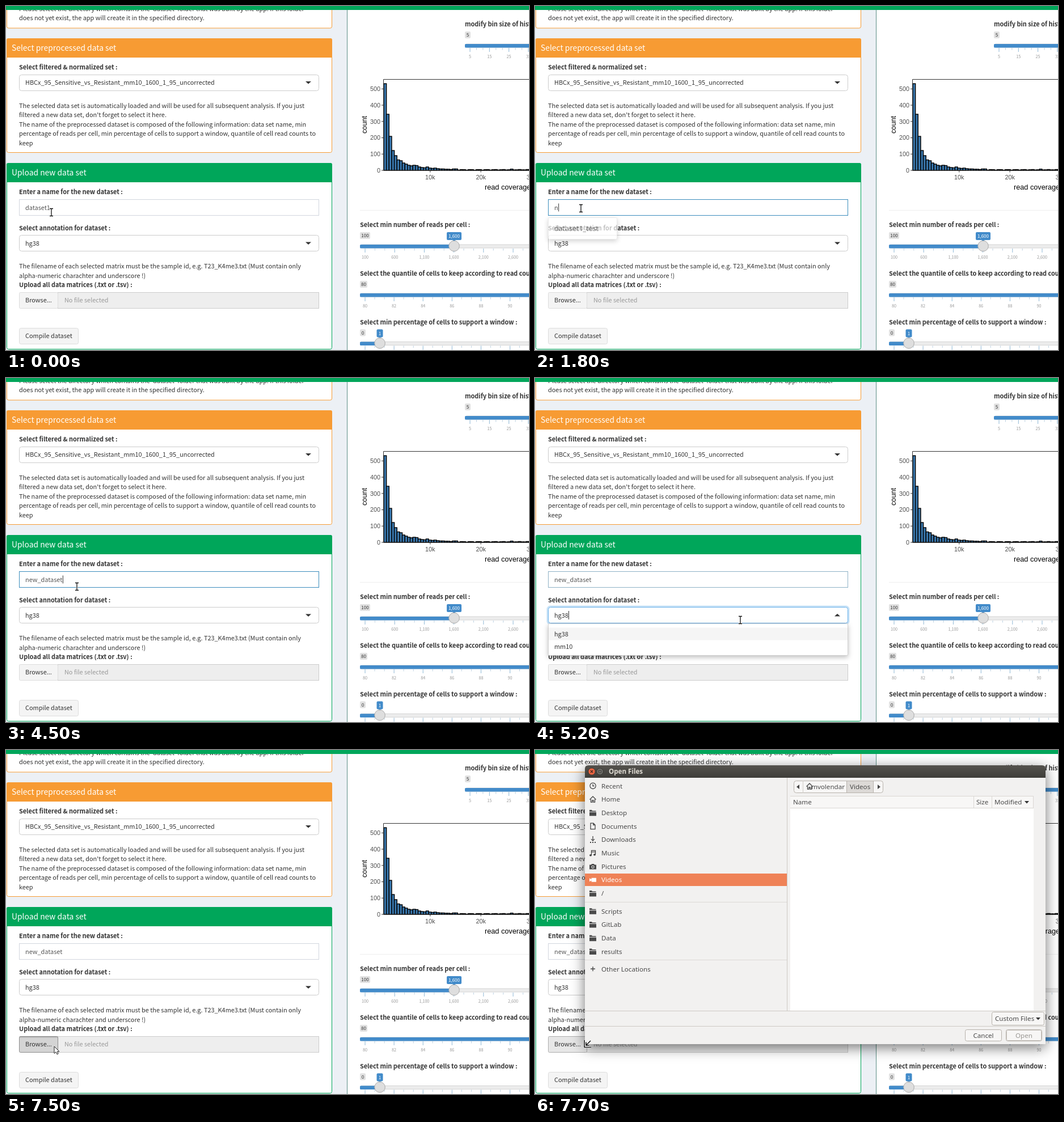
These frames come from a looping animation (922x607 px, 8000 ms). An HTML page:

```html
<!DOCTYPE html>
<html lang="en">
<head>
<meta charset="utf-8">
<title>Upload new data set</title>
<style>
  html, body { margin: 0; width: 100%; height: 100%; overflow: hidden; background: #fff; }
  svg { display: block; }
  text { font: 10.9px 'Noto Sans CJK SC', 'Noto Sans CJK JP', 'Noto Sans CJK KR', 'Noto Sans CJK', sans-serif; fill: #333; white-space: pre; }
  .b { font-weight: 700; }
  .title { font-size: 13.85px; fill: #fff; }
  .field { fill: #555; }
  .muted { fill: #999; }
  .pill { font-size: 8.1px; text-anchor: middle; }
  .grid { font-size: 7.2px; text-anchor: middle; fill: #999; }
  .axis { font: 10.8px 'Liberation Sans', Arial, sans-serif; fill: #4d4d4d; }
  .name { font: 12.7px 'Liberation Sans', Arial, sans-serif; fill: #000; }
  .ui { font: 11.6px 'Noto Sans', 'Open Sans', sans-serif; fill: #4a4a4a; }
  .ui.b { font-weight: 700; fill: #dfdbd2; }
  .mid { text-anchor: middle; }
  .end { text-anchor: end; }
  #dialog { filter: drop-shadow(0 6px 12px rgba(0, 0, 0, .55)); }
  #menu, #history { filter: drop-shadow(0 3px 4px rgba(0, 0, 0, .25)); }
</style>
</head>
<body>
<svg id="stage" width="922" height="607" viewBox="0 0 922 607"></svg>
<script>
const BLUE = '#428bca', GREEN = '#00a65a', ORANGE = '#f79b33';

const text = (x, y, str, cls = '', extra = '') =>
  `<text x="${x}" y="${y}" class="${cls}" ${extra}>${str}</text>`;
const rect = (x, y, w, h, fill, extra = '') =>
  `<rect x="${x}" y="${y}" width="${w}" height="${h}" fill="${fill}" ${extra}/>`;
const framed = (x, y, w, h, fill, stroke, r = 0, extra = '') =>
  rect(x + .5, y + .5, w - 1, h - 1, fill, `stroke="${stroke}" rx="${r}" ${extra}`);
const path = (d, fill = 'none', extra = '') => `<path d="${d}" fill="${fill}" ${extra}/>`;
const line = (d, stroke, width = 1, extra = '') =>
  path(d, 'none', `stroke="${stroke}" stroke-width="${width}" ${extra}`);
const lines = (x, y, step, rows) => rows.map((row, i) => text(x, y + i * step, row)).join('');
const down = (x, y, w = 10, h = 4.5, fill = '#333') => path(`M${x} ${y}h${w}l${-w / 2} ${h}z`, fill);

function panel(y, bottom, color, title) {
  return framed(1, y, 574, bottom - y, '#fff', color, 3) +
    path(`M1 ${y + 34}V${y + 3}q0-3 3-3h568q3 0 3 3v31z`, color) +
    text(10, y + 22, title, 'title');
}

function leftSide() {
  return framed(1, -20, 574, 59.5, '#fff', ORANGE, 3) +
    lines(23, 8.5, 16.5, [
      "Please select the directory which contains the 'dataset' folder that was built by the app. If this folder",
      'does not yet exist, the app will create it in the specified directory.']) +
    panel(57, 259, ORANGE, 'Select preprocessed data set') +
    text(23, 112, 'Select filtered &amp; normalized set :', 'b') +
    framed(23, 121, 529, 29, '#fff', '#ccc', 4) +
    text(34, 139, 'HBCx_95_Sensitive_vs_Resistant_mm10_1600_1_95_uncorrected') + down(528, 133) +
    lines(23, 179.5, 16.5, [
      'The selected data set is automatically loaded and will be used for all subsequent analysis. If you just',
      "filtered a new data set, don't forget to select it here.",
      'The name of the preprocessed dataset is composed of the following information: data set name, min',
      'percentage of reads per cell, min percentage of cells to support a window, quantile of cell read counts to',
      'keep']) +
    panel(277, 606, GREEN, 'Upload new data set') +
    text(23, 332, 'Enter a name for the new dataset :', 'b') +
    framed(23, 341, 529, 29, '#fff', '#d2d6de', 0, 'id="input"') +
    rect(34, 347.5, 45, 16, '#f07746', 'id="selection"') +
    text(34, 359.5, '', 'field', 'id="typed"') +
    rect(0, 348.5, 1, 14, '#333', 'id="caret"') +
    text(23, 396, 'Select annotation for dataset :', 'b') +
    rect(22, 403, 531, 31, 'none', 'id="glow" rx="5" stroke="#66afe9" stroke-opacity=".35" stroke-width="3"') +
    framed(23, 404, 529, 29, '#fff', '#ccc', 4, 'id="select"') +
    text(34, 422.5, 'hg38') + rect(59, 411, 1, 15, '#333', 'id="selectCaret"') +
    path('', '#333', 'id="chevron"') +
    lines(23, 463, 16.5, [
      'The filename of each selected matrix must be the sample id, e.g. T23_K4me3.txt (Must contain only',
      'alpha-numeric charachter and underscore !)']) +
    text(23, 496, 'Upload all data matrices (.txt or .tsv) :', 'b') +
    framed(91, 505, 461, 29, '#eee', '#ccc') + text(103, 523, 'No file selected', 'muted') +
    framed(23, 505, 69, 29, '#f4f4f4', '#ddd', 2, 'id="browse"') +
    line('M24 506.5H91', '#000', 3, 'id="pressed" opacity=".1"') +
    text(34, 522.5, 'Browse...') +
    framed(23, 568, 105, 29, '#f4f4f4', '#ddd', 3) + text(34, 586, 'Compile dataset');
}

function histogram() {
  const step = 4.65;
  const head = [153, 99, 60, 35, 26, 18.5, 17, 13, 11, 9, 8, 9, 8.5, 6, 5, 4.5, 6, 4,
    3.5, 4, 3, 2.5, 2.5, 2, 2, 1.5, 2.5, 2.5];
  let out = '';
  for (let i = 0; i < 56; i++) {
    const h = head[i] ?? (i === 48 ? 2.2 : .4 + 1.1 * Math.abs(Math.sin(i * 7.3)));
    out += rect(666 + i * step, 290 - h, step, h, '#3a78ae', 'stroke="#000" stroke-width="1.4"');
  }
  out += line('M922 129.5H665.5V290H922', '#333');
  for (let i = 0; i < 6; i++) {
    const y = 290 - i * 28.75;
    out += line(`M662 ${y}h3.5`, '#333') + text(660, y + 3.8, i * 100, 'axis end');
  }
  for (let i = 1; i < 4; i++) {
    const x = 658.5 + i * 89.3;
    out += line(`M${x} 290v3.5`, '#333') + text(x, 306, i * 10 + 'k', 'axis mid');
  }
  return out + text(844, 324, 'read coverage', 'name') +
    text(0, 0, 'count', 'name mid', 'transform="translate(636 209.5) rotate(-90)"');
}

// One range slider; y is the centre of its bar.
function slider(x, y, min, minWidth, first, step, labels, value, valueX, valueWidth) {
  let out = rect(x, y - 25, minWidth, 12, '#e1e1e1', 'rx="2"') + text(x + minWidth / 2, y - 16, min, 'pill');
  out += framed(x, y - 3.5, 330, 7, '#ececec', '#d5d5d5', 3) +
    rect(x, y - 3, (valueX ?? 950) - x, 6.5, BLUE, 'rx="1.5"');
  labels.forEach((label, i) => {
    const tick = first + i * step;
    out += line(`M${tick} ${y + 4}v7`, '#8fb8d6') +
      line(`M${tick + step / 3} ${y + 4}v3.5M${tick + step * 2 / 3} ${y + 4}v3.5`, '#b9cfe0') +
      text(tick, y + 22, label, 'grid');
  });
  if (value) {
    out += rect(valueX - valueWidth / 2, y - 25, valueWidth, 14, BLUE, 'rx="2"') + down(valueX - 2.5, y - 11, 5, 3, BLUE) +
      text(valueX, y - 15, value, 'pill', 'style="fill:#fff"') +
      `<circle cx="${valueX}" cy="${y - .5}" r="9.3" fill="#dedede" stroke="#aaa"/>`;
  }
  return out;
}

function rightSide() {
  return rect(601, 0, 321, 607, '#fff') + line('M601.5 0V607', '#5c8f86') +
    text(809, 36, 'modify bin size of histogram :', 'b') +
    slider(809, 70, 5, 10, 818, 34.3, [5, 15, 25, 35]) +
    histogram() + line('M624 360.5H922', '#eee') +
    text(624, 390, 'Select min number of reads per cell :', 'b') +
    slider(624, 424, 100, 18, 633, 52.2, [100, 600, '1,100', '1,600', '2,100', '2,600'], '1,600', 790, 26) +
    text(624, 476, 'Select the quantile of cells to keep according to read counts :', 'b') +
    slider(624, 510, 80, 13, 633, 51.1, [80, 82, 84, 86, 88, 90]) +
    text(624, 562, 'Select min percentage of cells to support a window :', 'b') +
    slider(624, 595.5, 0, 10, 633, 51.1, [0, 2, 4, 6, 8, 10], 1, 659, 11);
}

const menu = () => `<g id="menu">${framed(23, 433, 529, 57, '#fff', '#d0d0d0', 2)}
  ${rect(24, 440.5, 527, 22, '#f5f5f5', 'id="row"')}</g>
  <g id="menuText">${text(34, 455.5, 'hg38') + text(34, 477.5, 'mm10')}</g>`;

const historyList = () => `<g id="history">${framed(23, 373, 122, 39, '#fff', '#e2e2e2', 2)}
  ${text(34, 397, 'dataset1_test', 'ui', 'style="font-size:12.4px"')}</g>`;

const ICONS = {
  clock: line('M6 .8a5.2 5.2 0 1 0 .1 0M6 3v3.2h2.5', '#444', 1.3),
  home: line('M.5 6.5L6 1l5.500 5.500M2.500 6v5.200h2.500v-3.500h2v3.500h2.500V6', '#444', 1.3),
  folder: path('M0 1h4l1 1.500h6.500v1.500H0zM0 5h12v6.500H0z', '#4a4a4a'),
  page: line('M2 .8h5l3 3v7.500H2zM6.800 1v3h3', '#444', 1.3),
  load: line('M6 0v7M3 5l3 3 3-3', '#444', 1.3) + path('M1 10h2v2H1zM5 10h2v2H5zM9 10h2v2H9z', '#444'),
  music: line('M3.500 9.500V1.500h7v7M3.500 4h7', '#444', 1.3) + path('M0 10a2 1.800 0 1 1 4 0a2 1.800 0 1 1-4 0M7 9a2 1.800 0 1 1 4 0a2 1.800 0 1 1-4 0', '#444'),
  camera: path('M0 3h3l1-1.500h4L9 3h3v8H0z', '#4a4a4a') + '<circle cx="6" cy="6.800" r="2.200" fill="#4a4a4a" stroke="#fff"/>',
  film: path('M3.500 2.500H12v7H3.500V7L0 9V3l3.500 2z', '#fff'),
  plus: line('M2 6h8M6 2v8', '#444', 1.4)
};
const icon = (name, x, y) => `<g transform="translate(${x} ${y})">${ICONS[name]}</g>`;

function dialog() {
  const places = [['clock', 'Recent'], ['home', 'Home'], ['folder', 'Desktop'], ['page', 'Documents'],
    ['load', 'Downloads'], ['music', 'Music'], ['camera', 'Pictures'], ['film', 'Videos'], ['folder', '/'],
    ['folder', 'Scripts'], ['folder', 'GitLab'], ['folder', 'Data'], ['folder', 'results'], ['plus', 'Other Locations']];
  const rows = places.map(([kind, label], i) => {
    const y = 63.300 + i * 23.700 + (i > 8 ? 7.700 : 0) + (i > 12 ? 7.200 : 0);
    return icon(kind, 96, y - 6) + text(117, y + 4.200, label, 'ui', kind === 'film' ? 'style="fill:#fff"' : '');
  }).join('');
  const button = (x, y, w, h, label, color = '#4a4a4a') => framed(x, y, w, h, '#f7f6f5', '#b6b1aa', 3) +
    text(x + w / 2, y + h / 2 + 4.200, label, 'ui mid', `style="fill:${color}"`);

  return `<g id="dialog">` +
    path('M88 519V33q0-6 6-6h800q6 0 6 6v486z', '#f2f1f0') +
    path('M88 49V33q0-6 6-6h800q6 0 6 6v16z', 'url(#bar)') +
    '<circle cx="100" cy="38" r="6.200" fill="#ee6642" stroke="#34332f"/>' +
    line('M97.800 35.800l4.400 4.400m0-4.400l-4.400 4.400', '#4a2a20', 1.3) +
    '<circle cx="114.500" cy="38" r="5.800" fill="#706f6a" stroke="#34332f"/>' +
    line('M112.300 35.800h4.400v4.400h-4.400z', '#3a3935') +
    text(130, 42.300, 'Open Files', 'ui b') +
    rect(88, 218, 356, 22, '#ef8257') + rows +
    line('M88 268.500H444M88 370.500H444', '#dcd9d6') +
    line('M444.500 49V460M88 460.500H900M88 487.500H900', '#cdc9c4') +
    framed(456, 54, 158, 22, '#f7f6f5', '#b8b3ac', 4) +
    rect(549.500, 54.500, 47, 21, '#dcd9d6', 'stroke="#b8b3ac"') +
    line('M472.500 54V76', '#d0ccc7') +
    path('M466 61v8l-5-4zM604 61v8l5-4z', '#444') +
    text(546, 69.300, 'mvolendar', 'ui end') + icon('home', 478, 58) + text(555, 69.300, 'Videos', 'ui') +
    rect(450, 81, 429, 379, '#fff') + rect(450, 81, 429, 22, '#f8f7f6') +
    line('M450 81.500H879M450 102.500H879M773.500 81V103M805.500 81V103M878.500 81V103', '#dad7d3') +
    text(455, 96.200, 'Name', 'ui') + text(778, 96.200, 'Size', 'ui') + text(810, 96.200, 'Modified', 'ui') +
    down(863, 90, 8, 4.500) +
    button(805, 462, 93, 24, '') + text(811, 478, 'Custom Files', 'ui') + down(883, 472, 8, 4.500) +
    button(758, 493, 65, 21, 'Cancel') + button(830, 493, 64, 21, 'Open', '#9a9894') +
    framed(831, 494, 62, 19, 'none', '#c9c5c0', 2) + '</g>';
}

const halo = (d, width) => line(d, '#fff', width + 1.600) + line(d, '#111', width);
const CURSORS = {
  beam: halo('M-3-6.500h2.200L0-5.700L.8-6.500H3M-3 6.500h2.200L0 5.700L.8 6.500H3M0-5.700V5.700', 1.3),
  arrow: path('M0 0V12.500L3 9.800L5 14L7.200 13L5.200 9H9Z', '#fff', 'stroke="#222"'),
  hand: path('M-4.500-5Q-3-6.500-1.700-5L.5-2.200H4Q6-2 6 0V4L4.500 6.500H-2L-5 3Q-5.500 1-3.500 1H-.5Z', '#fff', 'stroke="#111" stroke-width="1.200"'),
  corner: halo('M-5-6V6.500H7M6-5L-2 3M-2-2.500V3H3.500', 1.6)
};

const stage = document.getElementById('stage');
stage.innerHTML = `<defs><linearGradient id="bar" x2="0" y2="1">
  <stop stop-color="#55534e"/><stop offset="1" stop-color="#3e3d39"/></linearGradient></defs>` +
  rect(0, 0, 922, 607, '#ecf0f5') + leftSide() + rightSide() + rect(0, 0, 922, 7, GREEN) +
  menu() + historyList() + dialog() +
  '<g id="cursor">' + Object.entries(CURSORS).map(([name, art]) => `<g id="${name}">${art}</g>`).join('') + '</g>';

const el = Object.fromEntries([...stage.querySelectorAll('[id]')].map(node => [node.id, node]));
const show = (node, on) => node.setAttribute('visibility', on ? 'visible' : 'hidden');
const between = (t, a, b) => t >= a && t < b;

const TYPING = [[0, 'dataset1'], [1800, 'n'], [1900, 'ne'], [2000, 'new'], [2300, 'new_'], [3300, 'new_dat'],
  [3400, 'new_data'], [3800, 'new_datas'], [4000, 'new_datase'], [4100, 'new_dataset']];

// Pointer stops: time, x, y
const ROUTE = [[0, 80, 364], [99, 80, 364], [100, 81, 357], [4300, 81, 357], [5100, 362, 427], [5200, 362, 427],
  [5600, 347, 472], [5800, 343, 475], [6100, 340, 455], [6500, 340, 455], [7300, 85, 523], [7600, 85, 523],
  [7700, 92, 518], [8000, 92, 518]];

function pointerAt(t) {
  const i = Math.max(1, ROUTE.findIndex(stop => stop[0] >= t));
  const [t0, x0, y0] = ROUTE[i - 1], [t1, x1, y1] = ROUTE[i];
  const u = (t - t0) / (t1 - t0), k = u * u * (3 - 2 * u);
  return [x0 + (x1 - x0) * k, y0 + (y1 - y0) * k];
}

function cursorKind(t, x, y, open) {
  if (t >= 7700) return 'corner';
  if (between(y, 341, 370)) return 'beam';
  if (between(y, 404, 433)) return open ? 'beam' : 'hand';
  if (open) return y > 440 ? 'hand' : 'arrow';
  if (between(y, 450, 482) || (y > 504 && x > 92)) return 'beam';
  return 'arrow';
}

function render(t) {
  const open = between(t, 5200, 6400), focused = between(t, 700, 5200);
  const value = TYPING.filter(step => step[0] <= t).pop()[1];
  const selected = between(t, 800, 1800);

  el.typed.textContent = value;
  el.typed.style.fill = selected ? '#fff' : '#555';
  show(el.selection, selected);
  show(el.caret, focused && !selected);
  el.caret.setAttribute('x', 34.500 + el.typed.getComputedTextLength());
  const border = t === 700 || t === 5200 ? '#8fb2c6' : focused ? '#3c8dbc' : '#d2d6de';
  el.input.setAttribute('stroke', border);

  const fade = t < 800 ? 0 : t < 900 ? .5 : t < 1800 ? 1 : t < 1900 ? .7 : t < 2000 ? .3 : 0;
  el.history.setAttribute('opacity', fade);

  const [x, y] = pointerAt(t);
  show(el.menu, open);
  show(el.menuText, open);
  show(el.glow, open);
  show(el.selectCaret, between(t, 5200, 5800));
  el.select.setAttribute('stroke', open ? '#66afe9' : '#ccc');
  el.chevron.setAttribute('d', open ? 'M528 420.500h10l-5-4.500z' : 'M528 416.500h10l-5 4.500z');
  el.row.setAttribute('y', y > 463 ? 462.500 : 440.500);

  const down = between(t, 7500, 7600), hover = t >= 7300;
  el.browse.setAttribute('fill', down ? '#d4d4d4' : hover ? '#e7e7e7' : '#f4f4f4');
  el.browse.setAttribute('stroke', down ? '#8c8c8c' : hover ? '#adadad' : '#ddd');
  show(el.pressed, down);
  show(el.dialog, t >= 7700);

  const kind = cursorKind(t, x, y, open);
  for (const name in CURSORS) show(el[name], name === kind);
  el.cursor.setAttribute('transform', `translate(${Math.round(x)} ${Math.round(y)})`);
}

const start = performance.now();
function tick() {
  const t = (performance.now() - start) % 8000;
  render(Math.floor(t / 100) * 100);
  requestAnimationFrame(tick);
}
tick();
</script>
</body>
</html>
```
